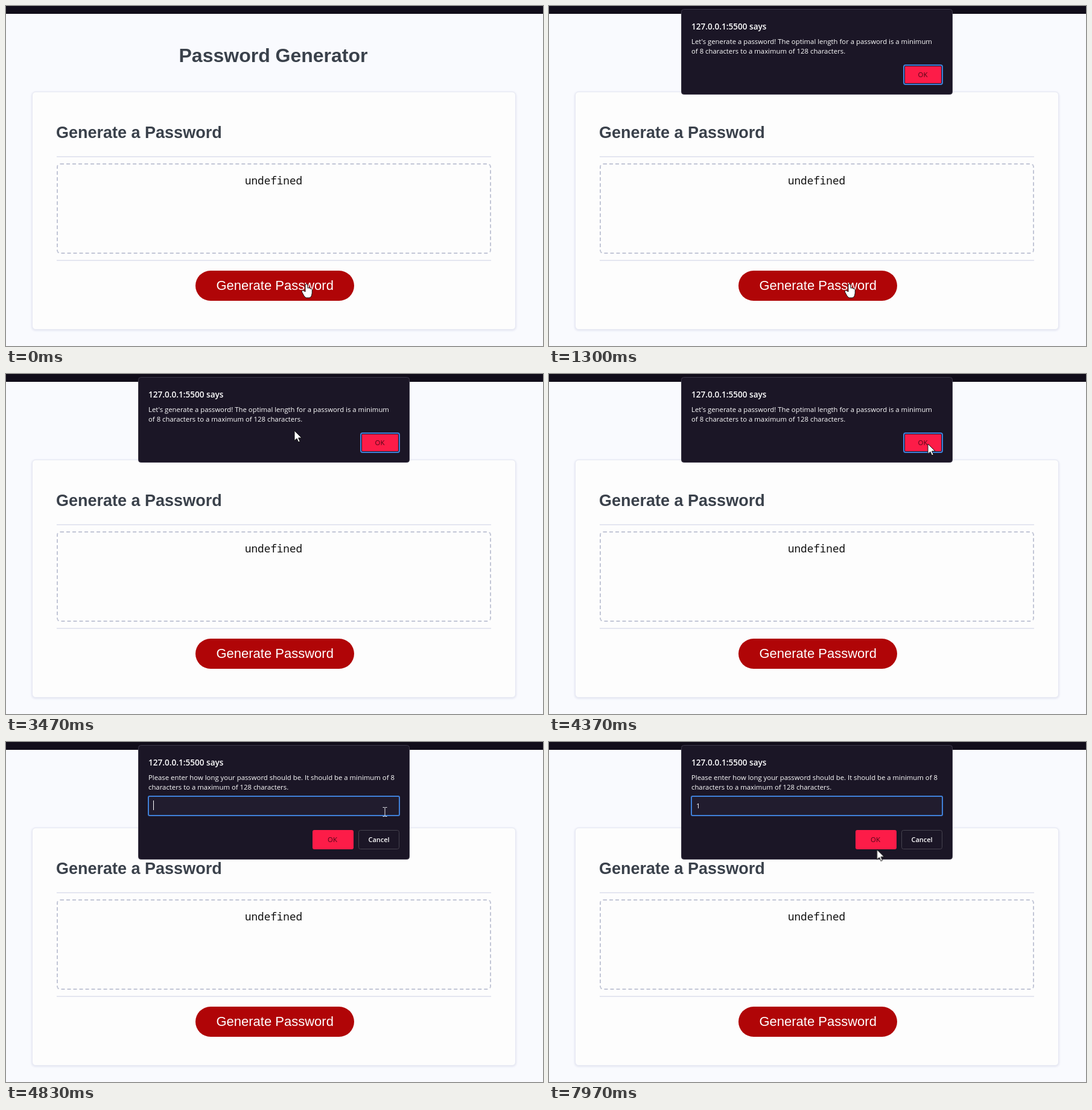
These frames come from a looping animation (890 by 564 pixels, 8 s). An HTML page:

```html
<!DOCTYPE html>
<html lang="en">
<head>
<meta charset="utf-8">
<title>Password Generator</title>
<style>
html, body { margin: 0; width: 100%; height: 100%; overflow: hidden; }
body { position: relative; background: #f9fafe; }
body > * { position: absolute; box-sizing: border-box; }
svg { overflow: visible; }

.bar { left: 0; top: 0; width: 100%; height: 13px; background: #110d1a; }
.card { left: 43px; top: 142px; width: 802px; height: 395px; border: 1px solid #e6e8f3; border-radius: 6px;
  background: #fdfdfd; box-shadow: 0 1px 3px 1px #e6e8f3; }
.rule { left: 84px; width: 720px; height: 2px; background: #e4e6f0; }
.output { left: 84px; top: 261px; width: 720px; height: 150px; border: 2px dashed #c2c6d6; border-radius: 6px; }
.button { left: 314px; top: 439px; width: 263px; height: 50px; border-radius: 25px; background: #b00507; }
.labels { left: 0; top: 0; }
.labels text { font-family: "Liberation Sans", Arial, sans-serif; fill: #3a414b; }
.labels .bold { font-weight: 700; }
.labels .mono { font: 17.6px "Noto Sans Mono", monospace; fill: #111; }
.labels .light { fill: #fff; }

.dialog { left: 219px; top: 5px; transform-origin: 50% 0; animation: 8s linear infinite; }
.dialog text { font: 11.35px "Open Sans", sans-serif; fill: #fff; }
.dialog .title { font-size: 13.6px; font-weight: 600; }
.dialog .ok { fill: #4c0616; text-anchor: middle; }
.dialog .cancel { font-size: 11px; font-weight: 600; text-anchor: middle; }
.panel { fill: #1b1626; stroke: #3c3848; }
.red { fill: #fd1c48; }
.focus { stroke: #4080d8; stroke-width: 2; }
.alert { animation-name: alert; }
.prompt { animation-name: prompt; }

@keyframes alert {
  0%, 11.9375% { opacity: 0; transform: translateY(-22px) perspective(1000px) rotateX(7deg); }
  13.8125%, 55.375% { opacity: 1; transform: translateY(0) perspective(1000px) rotateX(0deg); }
  55.875% { opacity: .75; transform: translateY(-9px) perspective(1000px) rotateX(2.5deg); }
  57.375%, 100% { opacity: 0; transform: translateY(-22px) perspective(1000px) rotateX(7deg); }
}
@keyframes prompt {
  0%, 54.9375% { opacity: 0; transform: translateY(-21px) perspective(1000px) rotateX(5.5deg); }
  56.8125%, 100% { opacity: 1; transform: translateY(0) perspective(1000px) rotateX(0deg); }
}

.caret { fill: #fff; animation: caret 8s step-end infinite; }
.typed { animation: typed 8s step-end infinite; }
@keyframes caret {
  0% { opacity: 1; transform: none; }
  61.5625% { opacity: 0; }
  68.1875% { opacity: 1; }
  81.625% { opacity: 0; transform: none; }
  87.5% { opacity: 1; transform: translateX(7px); }
  94.125%, 100% { opacity: 0; transform: translateX(7px); }
}
@keyframes typed { 0% { opacity: 0; } 87.5%, 100% { opacity: 1; } }

.pointer { left: 0; top: 0; animation: move 8s ease-in-out infinite; }
.pointer path { fill: #fff; stroke: #111; stroke-linejoin: round; animation: 8s step-end infinite; }
.pointer .hand { animation-name: hand; }
.pointer .arrow { animation-name: arrow; }
.pointer .beam { animation-name: beam; fill: none; stroke: #e8e8ec; }
@keyframes move {
  0%, 30% { transform: translate(498px, 461px); }
  40%, 46.25% { transform: translate(478px, 94px); }
  53%, 64% { transform: translate(628px, 116px); }
  72%, 91.5% { transform: translate(421px, 105px); }
  98%, 100% { transform: translate(543.5px, 178.5px); }
}
@keyframes hand { 0% { opacity: 1; } 32% { opacity: 0; } 100% { opacity: 0; } }
@keyframes arrow { 0% { opacity: 0; } 32% { opacity: 1; } 55.5% { opacity: 0; } 93.75%, 100% { opacity: 1; } }
@keyframes beam { 0% { opacity: 0; } 55.5% { opacity: 1; } 93.75%, 100% { opacity: 0; } }
</style>
</head>
<body>
<div class="bar"></div>
<div class="card"></div>
<div class="rule" style="top:249px"></div>
<div class="output"></div>
<div class="rule" style="top:421px"></div>
<div class="button"></div>

<svg class="labels" width="890" height="564">
  <text class="bold" x="286.5" y="93" font-size="32">Password Generator</text>
  <text class="bold" x="83" y="219" font-size="27">Generate a Password</text>
  <text class="mono" x="443.5" y="296" text-anchor="middle">undefined</text>
  <text class="light" x="445.7" y="471" font-size="22" text-anchor="middle">Generate Password</text>
</svg>

<svg class="dialog alert" width="450" height="142">
  <rect class="panel" x=".5" y=".5" width="449" height="141" rx="4"/>
  <text class="title" x="17" y="34">127.0.0.1:5500 says</text>
  <text x="17" y="58">Let's generate a password! The optimal length for a password is a minimum</text>
  <text x="17" y="74">of 8 characters to a maximum of 128 characters.</text>
  <rect class="focus" x="369" y="93" width="64" height="32" rx="3" fill="#1b1626"/>
  <rect class="red" x="371" y="95" width="60" height="28" rx="1"/>
  <text class="ok" x="400.5" y="113">OK</text>
</svg>

<svg class="dialog prompt" width="450" height="190">
  <rect class="panel" x=".5" y=".5" width="449" height="189" rx="4"/>
  <text class="title" x="17" y="34">127.0.0.1:5500 says</text>
  <text x="17" y="58">Please enter how long your password should be. It should be a minimum of 8</text>
  <text x="17" y="74">characters to a maximum of 128 characters.</text>
  <rect class="focus" x="17" y="85" width="416" height="32" rx="2" fill="#211c2e"/>
  <text class="typed" x="25" y="105">1</text>
  <rect class="caret" x="25" y="92" width="1" height="16"/>
  <rect class="red" x="289" y="141" width="68" height="32" rx="3"/>
  <text class="ok" x="322" y="161">OK</text>
  <rect x="365.5" y="141.5" width="67" height="31" rx="3" fill="none" stroke="#46434f"/>
  <text class="cancel" x="399" y="161">Cancel</text>
</svg>

<svg class="pointer" width="1" height="1">
  <path class="hand" d="M-2 13V2Q-2 0 0 0T2 2V7Q5.5 5.5 6 8Q9 7 9.3 9.5Q10 22 5 23H-1Q-4 21-7.5 13.5Q-8 10-5 11Z"/>
  <path class="arrow" d="M0 0V16.5L4 13L6.6 19L9.2 17.8L6.6 12H12Z"/>
  <path class="beam" d="M-3.5-7.5H-.5M.5-7.5H3.5M-3.5 7.5H-.5M.5 7.5H3.5M0-7V7"/>
</svg>
</body>
</html>
```
